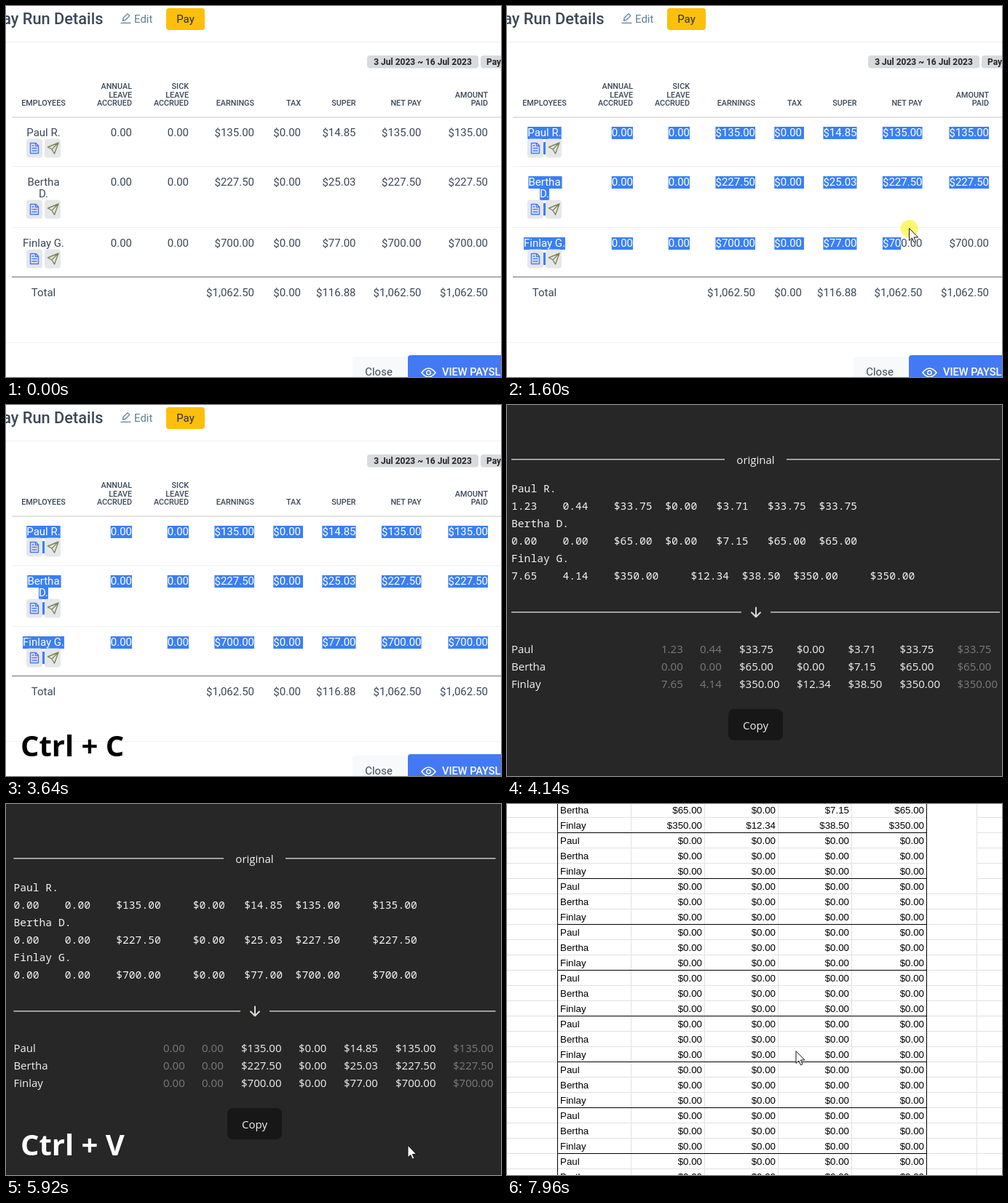
Recreate the animation shown at these times as an HTML page with a canvas. Size 680 by 510 pixels, loop 7.99 s.

```html
<!DOCTYPE html>
<html lang="en">
<head>
<meta charset="utf-8">
<title>Pay run copy and paste</title>
<style>
html, body { margin: 0; height: 100%; overflow: hidden; background: #fff; }
canvas { display: block; }
</style>
</head>
<body>
<canvas id="stage" width="680" height="510"></canvas>
<script>
const g = document.getElementById('stage').getContext('2d');
const LOOP = 7990, DRAG_FROM = 1070, DRAG_TO = 1908, COPY_AT = 4140, PASTE_AT = 5850, SHEET_AT = 7870;
const UI = 'Roboto, sans-serif', SANS = '"Open Sans", sans-serif';
const MONO = '14.67px "Noto Sans Mono", monospace';
const BODY = '15px ' + UI;
const INK = '#3b4858', BLUE = '#4479f6', SELECT = '#3a7ff7';
const first = ['Paul', 'Bertha', 'Finlay'], initial = ['R.', 'D.', 'G.'];

const payRun = [
  ['0.00', '0.00', '$135.00', '$0.00', '$14.85', '$135.00', '$135.00'],
  ['0.00', '0.00', '$227.50', '$0.00', '$25.03', '$227.50', '$227.50'],
  ['0.00', '0.00', '$700.00', '$0.00', '$77.00', '$700.00', '$700.00']
];
const lastRun = [
  ['1.23', '0.44', '$33.75', '$0.00', '$3.71', '$33.75', '$33.75'],
  ['0.00', '0.00', '$65.00', '$0.00', '$7.15', '$65.00', '$65.00'],
  ['7.65', '4.14', '$350.00', '$12.34', '$38.50', '$350.00', '$350.00']
];
const totals = ['', '', '$1,062.50', '$0.00', '$116.88', '$1,062.50', '$1,062.50'];
const right = [173, 251, 341, 405, 480.5, 570.5, 662];
const heads = [['ANNUAL', 'LEAVE', 'ACCRUED'], ['SICK', 'LEAVE', 'ACCRUED'], ['EARNINGS'],
  ['TAX'], ['SUPER'], ['NET PAY'], ['AMOUNT', 'PAID']];

// Pointer moves: start, end, target x, target y
const moves = [
  [0, 0, 592, 512], [100, 890, 24, 167], [DRAG_FROM, DRAG_TO, 682, 340], [3250, 3680, 640, 514],
  [COPY_AT, COPY_AT, 569, 514], [4380, 4720, 552, 469.5], [7150, 7600, 574, 514],
  [SHEET_AT, SHEET_AT, 447, 512], [SHEET_AT, 7960, 397, 340]
];
const arrow = new Path2D('M0 0V16.5L3.8 13L6.5 18.8L9 17.6L6.4 12H11.6Z');
const sheetIcon = new Path2D('M-5.5 -7H2L5.5 -3.5V7H-5.5ZM1.5 -7V-3H5.5M-3 -3.5H-1M-3 0H3M-3 3.5H3');
const plane = new Path2D('M7.5 -7.5L-7 -1.5L-1.5 1.5L2 7.5ZM7.5 -7.5L-1.5 1.5');
const pencil = new Path2D('M160.5 20L161.2 16.2L167 10.6L169.8 13.4L164 19.2ZM158 23.3H171');
const eye = new Path2D('M571 504Q580.5 492 590 504Q580.5 516 571 504ZM583.3 504A2.8 2.8 0 1 1 577.7 504A2.8 2.8 0 1 1 583.3 504');

function text(s, x, y, font, color, align = 'left') {
  g.font = font;
  g.fillStyle = color;
  g.textAlign = align;
  g.fillText(s, x, y);
}
function rect(x, y, w, h, color, r = 0) {
  g.fillStyle = color;
  g.beginPath();
  g.roundRect(x, y, w, h, r);
  g.fill();
}
function icon(path, x, y, color, width) {
  g.save();
  g.translate(x, y);
  g.strokeStyle = color;
  g.lineWidth = width;
  g.lineJoin = g.lineCap = 'round';
  g.stroke(path);
  g.restore();
}

function pointer(t) {
  let x = 0, y = 0;
  for (const [a, b, tx, ty] of moves) {
    if (t < a) break;
    const p = b > a ? Math.min(1, (t - a) / (b - a)) : 1;
    const e = p < .5 ? 4 * p ** 3 : 1 - 4 * (1 - p) ** 3;
    x += (tx - x) * e;
    y += (ty - y) * e;
  }
  return [x, y];
}

// Text whose characters left of the limit are selected
function selectable(s, x, y, align, limit, extra = 0) {
  text(s, x, y, BODY, INK, align);
  const full = g.measureText(s).width;
  const left = align == 'right' ? x - full : x - full / 2;
  let w = 0;
  for (let i = 1; i <= s.length; i++) {
    const next = g.measureText(s.slice(0, i)).width;
    if (left + (w + next) / 2 > limit) break;
    w = next;
  }
  if (!w) return;
  if (w == full) w += extra;
  g.save();
  rect(left, y - 13, w, 17, SELECT);
  g.clip();
  text(s, left, y, BODY, '#fff');
  g.restore();
}

function drawPage(t) {
  rect(0, 0, 680, 510, '#fff');
  text('Pay Run Details', 133.5, 25, '500 21.8px ' + UI, INK, 'right');
  icon(pencil, 0, 0, '#5d8296', 1.3);
  text('Edit', 176, 23, BODY, '#5d8296');
  rect(220, 3, 53, 30, '#fdbf0b', 4);
  text('Pay', 246.5, 23, BODY, '#2b2f36', 'center');
  rect(0, 49, 680, 1, '#f1f1f2');
  rect(496, 68, 153, 17.5, '#d9dadb', 4);
  rect(652, 68, 60, 17.5, '#d9dadb', 4);
  text('3 Jul 2023 ~ 16 Jul 2023', 572.5, 81, 'bold 12px ' + UI, '#22262b', 'center');
  text('Pay', 660, 81, 'bold 12px ' + UI, '#22262b');

  const head = '500 10.8px ' + UI;
  text('EMPLOYEES', 51.5, 137, head, INK, 'center');
  heads.forEach((lines, c) => lines.forEach((s, i) =>
    text(s, right[c], 137 - 11.4 * (lines.length - 1 - i), head, INK, 'right')));
  rect(8, 152, 672, 2, '#e2e3e4');
  rect(8, 220, 672, 1, '#f0f0f1');
  rect(8, 304, 672, 1, '#f0f0f1');
  rect(8, 372, 672, 1, '#6b6e72');
  rect(0, 462, 680, 1, '#f1f1f2');

  const dragged = t >= DRAG_FROM;
  const [px, py] = pointer(Math.min(t, DRAG_TO));
  const row = !dragged ? -1 : py < 220 ? 0 : py < 304 ? 1 : 2;
  [179, 247, 331].forEach((y, r) => {
    const limit = r < row ? 999 : r == row ? px - 10 : 0;
    const wrap = r == 1 ? 16 : 0;
    if (wrap) {
      selectable(first[r], 51.5, y, 'center', limit, 2);
      selectable(initial[r], 51.5, y + wrap, 'center', limit);
    } else selectable(first[r] + ' ' + initial[r], 51.5, y, 'center', limit);
    const mid = y + wrap + 16.5;
    rect(28, mid - 13, 22, 26, '#e6e7ea', 4);
    rect(53, mid - 13, 22, 26, '#e6e7ea', 4);
    if (limit > 51) rect(50, mid - 8.5, 3, 17, SELECT);
    icon(sheetIcon, 39, mid, BLUE, 1.4);
    icon(plane, 64.5, mid, '#7d8652', 1.4);
    payRun[r].forEach((s, c) => selectable(s, right[c], y, 'right', limit, c == 3 ? 3 : 0));
  });
  text('Total', 51.5, 399, BODY, INK, 'center');
  totals.forEach((s, c) => text(s, right[c], 399, BODY, INK, 'right'));

  rect(476, 482, 74, 40, '#f7f9fa', 4);
  text('Close', 512, 508, BODY, INK, 'center');
  rect(552, 480, 150, 40, BLUE, 4);
  icon(eye, 0, 0, '#fff', 1.6);
  text('VIEW PAYSLIPS', 599, 508, '500 14.6px ' + UI, '#fff');
  shortcut(t, 2250, 2610, 'C', '#000');
}

function shortcut(t, start, done, key, color) {
  if (t >= start) text('Ctrl +' + (t >= done ? ' ' + key : ''), 20, 483, 'bold 40px ' + SANS, color);
}

function drawTool(t) {
  const pasted = t >= PASTE_AT;
  const data = pasted ? payRun : lastRun;
  const x0 = pasted ? 10.4 : 6;
  const cols = pasted ? [216, 269, 323, 402, 464, 535, 614] : [212, 265, 319, 398, 468.5, 539.5, 618.5];
  const white = '#f2f2f2', font = '15px ' + SANS;
  rect(0, 0, 680, 510, '#272727');
  for (const [y, a, b] of [[74, 299, 384], [284, 322, 362]]) {
    rect(x0, y, a - x0, 1.4, '#c6c6c6');
    rect(b, y, 683 - x0 - b, 1.4, '#c6c6c6');
  }
  text('original', 341.5, 81, font, white, 'center');
  icon(new Path2D('M342 278.5V291M336 285.3L342 291.3L348 285.3'), 0, 0, '#d6dfd6', 2);
  data.forEach((line, r) => {
    const y = 120 + r * 48, y2 = 341 + r * 24;
    text(first[r] + ' ' + initial[r], x0, y, MONO, white);
    text(first[r], x0, y2, font, white);
    let stop = 0;
    line.forEach((s, c) => {
      text(s, x0 + stop * 8.8, y + 24, MONO, white);
      stop += 4 * (Math.floor((s.length + 1) / 4) + 1);
      text(s, cols[c], y2, font, c < 2 || c > 5 ? '#7b7b7b' : white);
    });
  });
  rect(304, 418, 75, 43, '#171717', 8);
  text('Copy', 341.5, 446, font, white, 'center');
  shortcut(t, 5560, 5920, 'V', '#fff');
}

function drawSheet() {
  const font = '13.33px "Liberation Sans", Arial, sans-serif', line = '#e1e1e1';
  rect(0, 0, 680, 510, '#fff');
  for (const x of [170, 271, 372, 473, 645]) rect(x, 0, 1, 510, line);
  for (let i = 0; i < 25; i++) {
    const y = 18 + i * 21;
    rect(0, y, y < 123 ? 577 : 680, 1, line);
    rect(645, y, 35, 1, line);
    if (i % 3 == 1) rect(69, y, 508, 1, '#000');
    text(first[(i + 1) % 3], 73, y - 5, font, '#000');
    [268, 369, 470, 573].forEach((x, c) =>
      text(i < 2 ? lastRun[i + 1][c + 2] : '$0.00', x, y - 5, font, '#000', 'right'));
  }
  rect(69, 0, 1, 510, '#000');
  rect(576, 0, 1, 510, '#000');
}

function draw(now) {
  const t = now % LOOP;
  if (t < COPY_AT) drawPage(t);
  else if (t < SHEET_AT) drawTool(t);
  else drawSheet();

  const [x, y] = pointer(t);
  const pressed = t >= DRAG_FROM && t < 2150 || t >= 4750 && t < 4890;
  if (pressed) rect(x - 12, y - 12, 24, 24, 'rgba(252,243,50,.7)', 12);
  g.save();
  g.translate(x, y);
  g.fillStyle = '#fff';
  g.fill(arrow);
  g.restore();
  icon(arrow, x, y, '#111', 1);
}

const start = performance.now();
function tick() {
  draw(performance.now() - start);
  requestAnimationFrame(tick);
}
tick();
</script>
</body>
</html>
```
